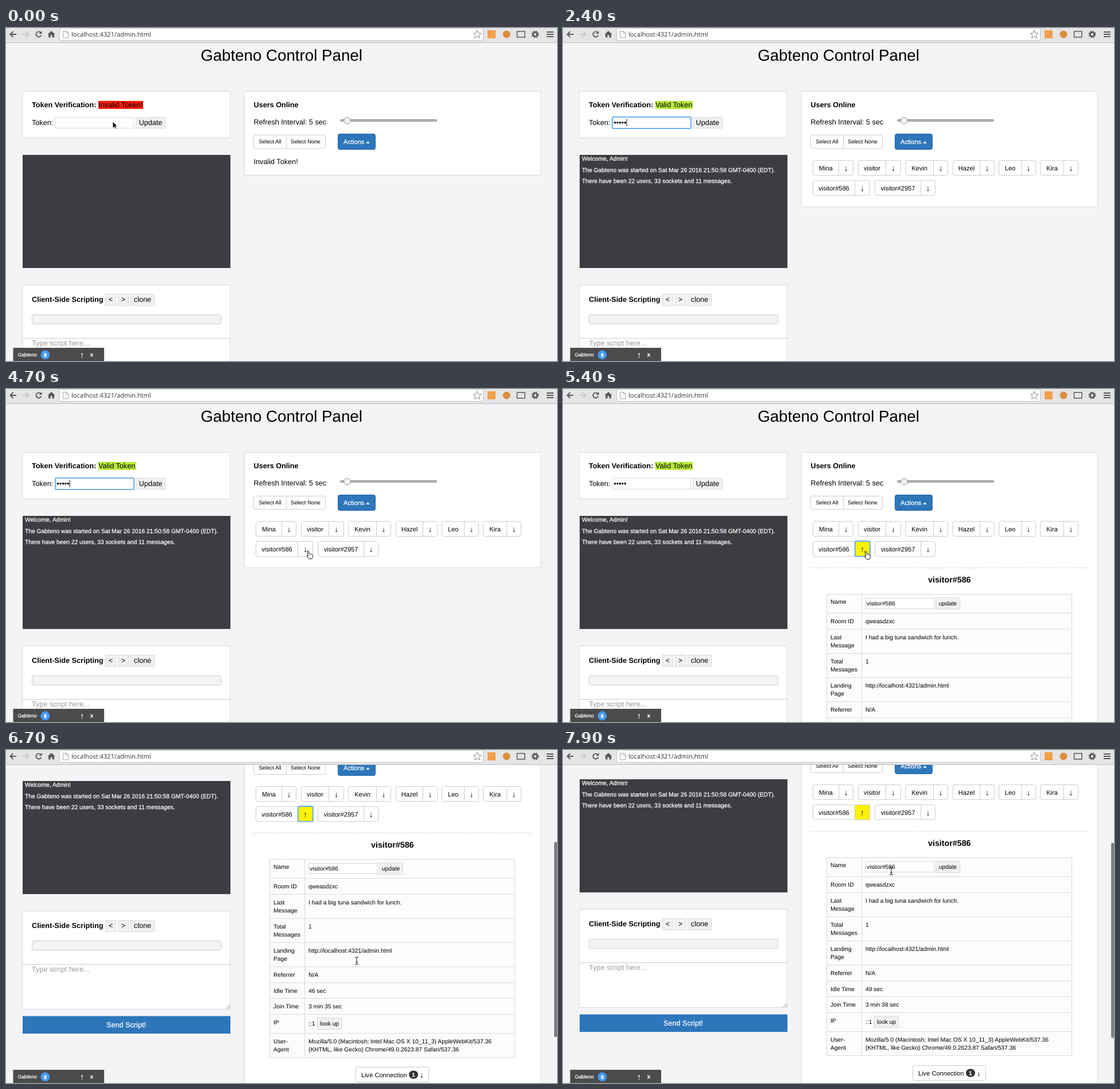
Write an HTML page that moves like this. It is 960x580 px and loops after 8000 ms.

```html
<!DOCTYPE html>
<html lang="en">
<head>
<meta charset="utf-8">
<title>Control Panel</title>
<style>
html, body { margin: 0; width: 100%; height: 100%; overflow: hidden; background: #f4f3f6; }
svg { display: block; }
text { font-family: "Liberation Sans", Arial, sans-serif; text-rendering: geometricPrecision; }
</style>
</head>
<body>
<svg id="stage" width="960" height="580" viewBox="0 0 960 580"></svg>
<script>
const XS = 8.7, SM = 9.5, MD = 10.3, BTN = 11.08, BASE = 12.67, ARROW = 14;
const LINE = '#d9d8db', BLUE = '#2d76ba';
const guest = 'visitor#586';

const text = (x, y, s, size = BASE, attrs = '') =>
  `<text x="${x}" y="${y}" font-size="${size}" ${attrs}>${s}</text>`;
const bold = 'font-weight="700" ', mid = 'text-anchor="middle" ';
const white = 'fill="#fff" stroke="#fff" stroke-width=".25" ';
const fill = (x, y, w, h, color, attrs = '') =>
  `<rect x="${x}" y="${y}" width="${w}" height="${h}" fill="${color}" ${attrs}/>`;
// Outlined box given by its pixel edges, with the border on half pixels.
const box = (x, y, x2, y2, color = '#fff', border = LINE, rx = 0, attrs = '') =>
  fill(x + .5, y + .5, x2 - x - 1, y2 - y - 1, color, `stroke="${border}" rx="${rx}" ${attrs}`);
const path = (d, attrs) => `<path d="${d}" ${attrs}/>`;
const line = (d, color = LINE, attrs = '') => path(d, `fill="none" stroke="${color}" ${attrs}`);
const group = (id, ...parts) => `<g id="${id}">${parts.join('')}</g>`;
const button = (x, y, x2, y2, label, size, base) =>
  box(x, y, x2, y2, '#f1f0f2') + text((x + x2) / 2, base, label, size, mid);
const focusRing = (x, y, w, h) =>
  fill(x, y, w, h, 'none', 'stroke="#6fb1f3" stroke-width="2.2" rx="2"');

const userButton = (name, x, div, x2, y) =>
  box(x, y, x2, y + 27, '#fff', '#cccbce', 3) +
  line(`M${div + .5} ${y + 1}v25`, '#cccbce') +
  text((x + div) / 2 + .5, y + 17.5, name, BTN, mid) +
  text((div + x2) / 2, y + 18.7, '↓', ARROW, mid);

const users = [
  ['Mina', 435, 480, 506, 230], ['visitor', 514, 562, 589, 230], ['Kevin', 596, 645, 671, 230],
  ['Hazel', 679, 726, 752, 230], ['Leo', 759, 798, 824, 230], ['Kira', 831, 872, 898, 230],
  [guest, 435, 508, 535, 265], ['visitor#2957', 543, 623, 649, 265]
].map(u => userButton(...u)).join('');

// Table rows: top, first baseline, label lines, value lines.
const rows = [
  [357, 374, ['Name'], []],
  [390, 407.5, ['Room ID'], ['qweasdzxc']],
  [418, 435.5, ['Last', 'Message'], ['I had a big tuna sandwich for lunch.']],
  [460, 477.5, ['Total', 'Messages'], ['1']],
  [502, 519.5, ['Landing', 'Page'], ['http://localhost:4321/admin.html']],
  [544, 561.5, ['Referrer'], ['N/A']],
  [572, 589.5, ['Idle Time'], ['<tspan id="idle"></tspan>']],
  [599, 617.3, ['Join Time'], ['<tspan id="join"></tspan>']],
  [627, 644.5, ['IP'], []],
  [660, 677.8, ['User-', 'Agent'], [
    'Mozilla/5.0 (Macintosh; Intel Mac OS X 10_11_3) AppleWebKit/537.36',
    '(KHTML, like Gecko) Chrome/49.0.2623.87 Safari/537.36']]
];
const table = box(459, 357, 887, 703, '#fcfbfd') +
  rows.slice(1).map(([top]) => line(`M459 ${top + .5}H887`)).join('') +
  rows.map(([, y, label, value]) =>
    label.map((s, i) => text(466, y + 14.2 * i, s, MD)).join('') +
    value.map((s, i) => text(527, y + 14.2 * i, s, MD)).join('')).join('') +
  line('M520.5 357V702') +
  box(527, 364, 647, 383) + text(529, 376.5, guest, MD) +
  button(649, 363, 692, 384, 'update', MD, 377) +
  text(527, 647, '::1', MD) + button(542, 633, 585, 654, 'look up', MD, 647);

const page = group('page',
  text(480, 57, 'Gabteno Control Panel', 27.7, mid),

  box(28, 110, 391, 192),
  text(45, 138, 'Token Verification:', BASE, bold),
  group('bad', fill(161, 127, 78, 14, '#fb1d08'), text(161, 138, 'Invalid Token!')),
  group('good', fill(161, 127, 65, 14, '#b9ea3a'), text(161, 138, 'Valid Token')),
  text(45, 169, 'Token:'),
  box(86, 155, 223, 175),
  group('fieldFocus', focusRing(86, 155, 137, 20)),
  '<text id="dots" x="88.3" y="168.5" font-size="12.67"></text>',
  fill(0, 158, 1, 13, '#111', 'id="caret"'),
  button(226, 155, 278, 175, 'Update', BASE, 169),

  fill(29, 221, 362, 197, '#3e3c40'),
  group('log',
    text(33, 230.5, 'Welcome, Admin!', MD, white),
    text(33, 250.5, 'The Gabteno was started on Sat Mar 26 2016 21:50:58 GMT-0400 (EDT).', MD, white),
    text(33, 270.3, 'There have been 22 users, 33 sockets and 11 messages.', MD, white)),

  box(28, 447, 391, 619),
  text(45, 477, 'Client-Side Scripting', BASE, bold),
  button(173, 463, 192, 484, '&lt;', BASE, 477),
  button(195, 463, 214, 484, '&gt;', BASE, 477),
  button(217, 463, 259, 484, 'clone', BASE, 477),
  box(45, 499, 375, 516, '#f4f3f5', '#cccbce', 2.5),
  line('M28 540.5H391', '#cccbce'),
  text(45, 553, 'Type script here...', BASE, 'fill="#9a999c"'),
  line('M384 617.5l6-6M387.5 617.5l2.5-2.5', '#777'),
  fill(29, 630.5, 362, 30.5, BLUE),
  text(209.5, 650, 'Send Script!', BASE, white + mid),

  box(415, 110, 932, 257, '#fff', LINE, 0, 'id="panel"'),
  text(431.5, 138, 'Users Online', BASE, bold),
  text(431.5, 167.5, 'Refresh Interval: 5 sec'),
  box(582, 159, 751, 163, '#bbb', '#8e8d90', 1.5),
  '<circle cx="594.5" cy="161.3" r="5.7" fill="#f2f1f3" stroke="#8f8e91"/>',
  box(431, 186, 557, 210, '#fff', '#cccbce', 2.5),
  line('M488.5 187V209', '#cccbce'),
  text(460, 201.3, 'Select All', SM, mid), text(522, 201.3, 'Select None', SM, mid),
  box(578, 184, 644, 212, BLUE, '#2867a5', 3),
  text(588, 202, 'Actions', BTN, white),
  path('M627.2 200.8h6.4l-3.2-3.4z', white),
  group('denied', text(431.5, 237, 'Invalid Token!')),
  group('users', users),
  group('details',
    box(508, 265, 535, 292, '#fff200', '#cccbce'),
    text(521.5, 283.7, '↑', ARROW, mid),
    group('buttonFocus', focusRing(508.8, 265.2, 26, 26.3)),
    line('M431 311.5H915', '#d2d1d4', 'stroke-dasharray="3 2"'),
    text(673.3, 337, guest, 14.25, bold + mid),
    table,
    box(609, 719, 737, 746, '#fff', '#cccbce', 3),
    text(619, 736.5, 'Live Connection', BTN),
    fill(702, 725.5, 16, 14, '#333', 'rx="7"'),
    text(710, 736, '1', SM, bold + white + mid),
    text(724.2, 737.5, '↓', ARROW, mid)));

const icon = '#5a595b';
const toolbar =
  fill(0, 0, 960, 25, '#e5e4e6') + fill(0, 25, 960, 1, '#bdbcbe') +
  box(93, 0, 832, 22, '#fff', '#c4c3c5', 2) +
  line('M18 11H8M12.5 6L7.5 11l5 5', icon, 'stroke-width="2"') +
  line('M29 11H39M34.5 6l5 5-5 5', '#c9c8ca', 'stroke-width="2"') +
  line('M60.5 8A4.6 4.6 0 1 0 61.3 12.5', icon, 'stroke-width="1.9"') +
  path('M62.5 5v5h-5z', `fill="${icon}"`) +
  path('M79 5l6.5 6H84v5.5h-3.5V12.5h-3v4H74V11h-1.5z', `fill="${icon}"`) +
  path('M99.5 5.5h6l3.5 3.5v8h-9.5zM105.5 5.5V9h3.5', 'fill="#fff" stroke="#a5a4a6"') +
  text(114, 15.2, 'localhost:4321/admin.html', 11.1, `style="font-family:'Open Sans',sans-serif" fill="#333"`) +
  path('M821 4l2 4.7 5 .5-3.8 3.3 1.2 5-4.4-2.7-4.4 2.7 1.2-5-3.8-3.3 5-.5z', 'fill="#fff" stroke="#8b8a8c"') +
  fill(839, 4, 14, 14, '#f0a04b', 'rx="1"') +
  '<circle cx="872" cy="11" r="6.5" fill="#d98f3f"/>' +
  line('M890.5 6h13.5v10h-13.5z', icon, 'stroke-width="1.5"') +
  `<circle cx="922" cy="11" r="5" fill="none" stroke="${icon}" stroke-width="3" stroke-dasharray="2.2 1.727"/>` +
  `<circle cx="922" cy="11" r="3.5" fill="none" stroke="${icon}" stroke-width="2.6"/>` +
  line('M942 7H954M942 11H954M942 15H954', icon, 'stroke-width="2"');

const chatBar =
  fill(12.5, 557, 158.5, 23, '#4b4a4d') +
  text(20.5, 572.3, 'Gabteno', XS, white) +
  '<circle cx="68.3" cy="569.3" r="8" fill="#4397f0"/>' +
  text(68.3, 572.6, '8', SM, bold + white + mid) +
  text(132.5, 574, '↑', ARROW, white + mid) +
  text(149.3, 572.3, 'x', SM, bold + white + mid);

const pointers =
  path('M0 0V11.3L2.6 9 4.3 12.8 6.2 12 4.6 8.3H8z',
    'id="arrow" fill="#000" stroke="#fff" stroke-width=".8"') +
  path('M-1 0q1-1.2 2 0l1.5 4.5 4 1q2 .6 2 2.5l-.6 3-1 2.5H2.3L-1.5 8.8q-.6-1.6 1.3-1l.9.7z',
    'id="hand" fill="#fff" stroke="#111"') +
  line('M-3-6.5q2.5 0 3 1.2 .5-1.2 3-1.2M0-5.5V5.5M-3 6.5q2.5 0 3-1.2 .5 1.2 3 1.2M-1.5 2.5h3',
    '#111', 'id="beam"');

const stage = document.getElementById('stage');
stage.innerHTML = fill(0, 0, 960, 580, '#f4f3f6') + page +
  fill(955, 160, 5, 340, '#7d7c7f', 'id="thumb" rx="2.5"') +
  chatBar + toolbar + group('cursor', pointers);

const $ = id => document.getElementById(id);
const show = (id, on) => $(id).setAttribute('visibility', on ? 'visible' : 'hidden');

// Piecewise value of [time, value...] keys, optionally eased per segment.
function track(keys, t, ease = u => u) {
  const i = keys.findIndex(k => k[0] > t);
  if (i < 0) return keys[keys.length - 1].slice(1);
  if (i === 0) return keys[0].slice(1);
  const a = keys[i - 1], b = keys[i], u = ease((t - a[0]) / (b[0] - a[0]));
  return a.slice(1).map((v, j) => v + (b[j + 1] - v) * u);
}
const smooth = u => u * u * (3 - 2 * u);

const LOOP = 8000, FOCUS = 600, VALID = 2400, OPEN = 5000, REFRESH = 7500;
const keyTimes = [1150, 1350, 1550, 1750, 1950];
const cursorKeys = [
  [0, 186, 163], [2750, 186, 163], [3400, 371, 200], [3750, 371, 200], [4750, 527, 283],
  [5550, 527, 283], [6200, 611, 367], [7350, 611, 367], [7850, 572, 211]
];
const scrollKeys = [
  [6300, 0], [6400, 35], [6500, 95], [6600, 142], [6700, 167], [6900, 174], [7450, 174], [7800, 170]
];
// Each pointer shape holds from its time on.
const pointerKeys = [
  [0, 'arrow'], [1100, ''], [2800, 'arrow'], [4500, 'hand'], [5700, 'arrow'],
  [6500, 'beam'], [7100, 'arrow'], [7800, 'beam']
];

function draw(t) {
  const valid = t >= VALID, open = t >= OPEN, fresh = t >= REFRESH;
  const focused = t >= FOCUS && !open;
  const typed = keyTimes.filter(k => t >= k).length;

  show('bad', !valid);
  show('denied', !valid);
  for (const id of ['good', 'log', 'users']) show(id, valid);
  show('details', open);
  show('buttonFocus', open && !fresh);
  show('fieldFocus', focused);
  show('caret', focused);
  $('dots').textContent = '•'.repeat(typed);
  $('caret').setAttribute('x', 88.5 + Math.round(typed * 4.43));
  $('panel').setAttribute('height', open ? 680 : valid ? 201 : 146);
  $('idle').textContent = fresh ? '49 sec' : '46 sec';
  $('join').textContent = fresh ? '3 min 38 sec' : '3 min 35 sec';

  const scroll = Math.round(track(scrollKeys, t)[0]);
  $('page').setAttribute('transform', `translate(0 ${-scroll})`);
  show('thumb', scroll > 0);
  $('thumb').setAttribute('y', 160 + (scroll - 167) * .6);

  const [x, y] = track(cursorKeys, t, smooth);
  const shape = pointerKeys.filter(k => t >= k[0]).pop()[1];
  $('cursor').setAttribute('transform', `translate(${x} ${y})`);
  for (const id of ['arrow', 'hand', 'beam']) show(id, id === shape);
}

const start = performance.now();
function tick() {
  draw((performance.now() - start) % LOOP);
  requestAnimationFrame(tick);
}
tick();
</script>
</body>
</html>
```
